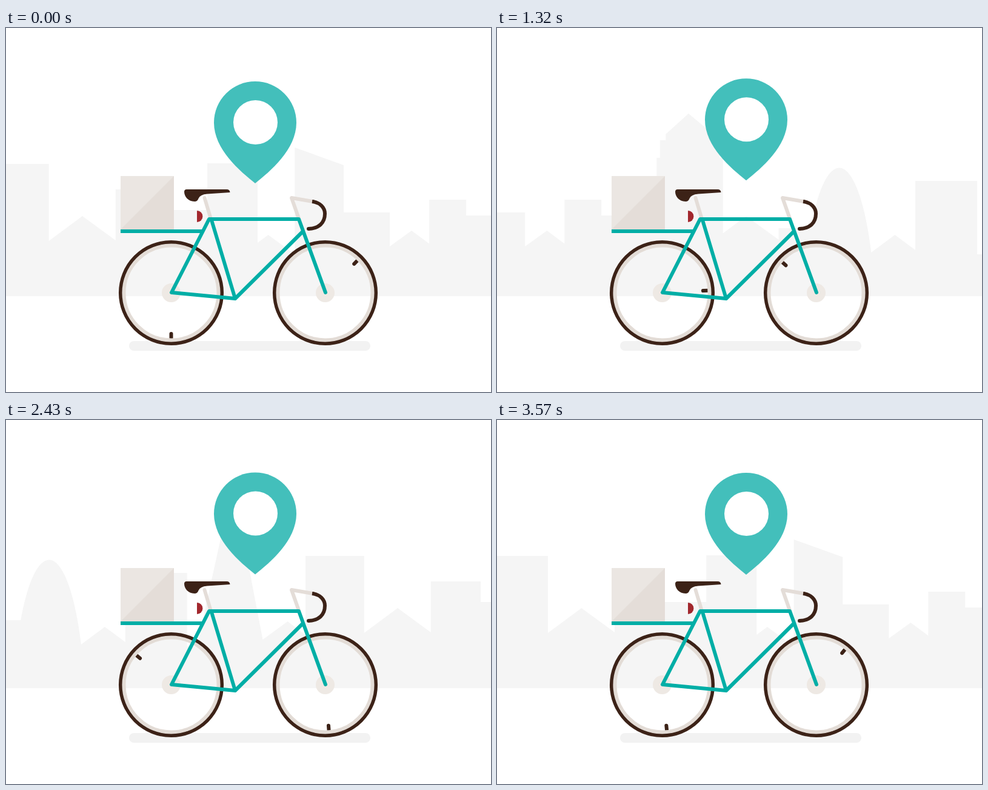
Animation, 800 px wide and 600 px high, one loop 3.6 s. Source, as an HTML page:

```html
<!DOCTYPE html>
<html lang="en">
<head>
<meta charset="utf-8">
<title>Bicycle delivery</title>
<style>
  html, body { margin: 0; width: 100%; height: 100%; overflow: hidden; background: #fff; }
  svg { display: block; width: 100vw; height: 100vh; }
</style>
</head>
<body>
<svg viewBox="0 0 800 600">
  <defs>
    <path id="city" fill="#f5f5f5" d="M-26 442V224H70.7V351L126 310L180.7 350V266H263V300H332V223H415V354L432.5 341L476.3 373
      V197L557 226V304H633V360L669 334L698 355.5V283H759V309H850V214H855.5V185H865V175L902.6 141L944.3 176V185H954V214H959.3
      V338.5L997.6 310L1051.3 349V330H1104.2A59.6 260 0 0 1 1203.9 370L1243 341L1276.7 366V252H1378.7V373H1395
      L1454.2 104L1503.5 362L1544.6 332L1574.2 354.5V442Z"/>
    <g id="wheel" fill="none">
      <circle r="15.5" fill="#eee9e4"/>
      <g stroke="#3c2217" stroke-width="6">
        <path class="valve" stroke-linecap="round" d="M0 67.5V75"/>
      </g>
      <circle r="78.2" stroke="#e3dcd6" stroke-width="6.4"/>
      <circle r="83.8" stroke="#3c2217" stroke-width="5.5"/>
    </g>
  </defs>

  <g id="skyline">
    <use href="#city"/>
    <use href="#city" x="1600"/>
  </g>
  <rect x="203" y="516" width="398" height="16" rx="8" fill="#f2f2f2"/>

  <g id="pin">
    <path fill="#43bfbb" d="M343 156A68 68 0 0 1 479 156C479 200 436 236 411 256C386 236 343 200 343 156Z"/>
    <circle cx="411.5" cy="155.5" r="36.5" fill="#fff"/>
  </g>

  <path fill="#ebe6e2" d="M189 244h88v88h-88z"/>
  <path fill="#e4ddd8" d="M277 244v88h-88z"/>
  <path fill="#a2272d" d="M315 301a9.4 9.5 0 0 1 0 19z"/>

  <g class="wheel" transform="translate(272.5 436.5)"></g>
  <g class="wheel" transform="translate(526.5 436.5)"></g>

  <g fill="none" stroke-width="6" stroke-linecap="round" stroke-linejoin="round">
    <path stroke="#e4ddd8" d="M327.5 280L338 315M506 286L471 280L483 314"/>
    <path stroke="#3c2217" stroke-linecap="butt" d="M505 286C518 287.500 526 296 526 306C526 321 516 330.500 499 331"/>
    <path stroke="#3c2217" d="M499 331h.1"/>
    <path stroke="#00aea6" stroke-linecap="butt" d="M189 335H324"/>
    <path stroke="#00aea6" d="M527 436L483 315H335L273 436L378 446L490 335M338.500 315L378 446"/>
  </g>
  <path fill="#3c2217" d="M298 266H364Q369 266 369.500 271L332 273.500Q320 274.500 317.500 281Q316 286 311 286C300 286 294 277 294 270Q294 266 298 266Z"/>
</svg>

<script>
  const LOOP = 3600, STEP = 30, CITY_WIDTH = 1600;
  const pinTurns = [0, 600, 1170, 1800, 2385, 3000, 3600];
  const spinKeys = [[0, 0], [870, 180], [1800, 360]];
  const pinKeys = pinTurns.map((time, i) => [time, i % 2 ? -20 : 0]);

  const skyline = document.getElementById('skyline');
  const pin = document.getElementById('pin');
  const wheel = document.getElementById('wheel');
  const valves = [...document.querySelectorAll('.wheel')].map(slot => {
    const copy = slot.appendChild(wheel.cloneNode(true));
    copy.removeAttribute('id');
    return copy.querySelector('.valve');
  });

  // Linear interpolation through [time, value] keys
  function tween(keys, t) {
    const i = keys.findIndex(([time]) => time > t);
    const [t0, v0] = keys[i - 1], [t1, v1] = keys[i];
    return v0 + (v1 - v0) * (t - t0) / (t1 - t0);
  }

  function draw(t) {
    const spin = tween(spinKeys, t % 1800);
    skyline.setAttribute('transform', `translate(${-CITY_WIDTH * t / LOOP} 0)`);
    pin.setAttribute('transform', `translate(0 ${tween(pinKeys, t)})`);
    valves[0].setAttribute('transform', `rotate(${spin})`);
    valves[1].setAttribute('transform', `rotate(${spin - 135})`);
  }

  const start = performance.now();
  function tick() {
    const elapsed = (performance.now() - start) % LOOP;
    draw(Math.floor(elapsed / STEP) * STEP);
    requestAnimationFrame(tick);
  }
  tick();
</script>
</body>
</html>
```
